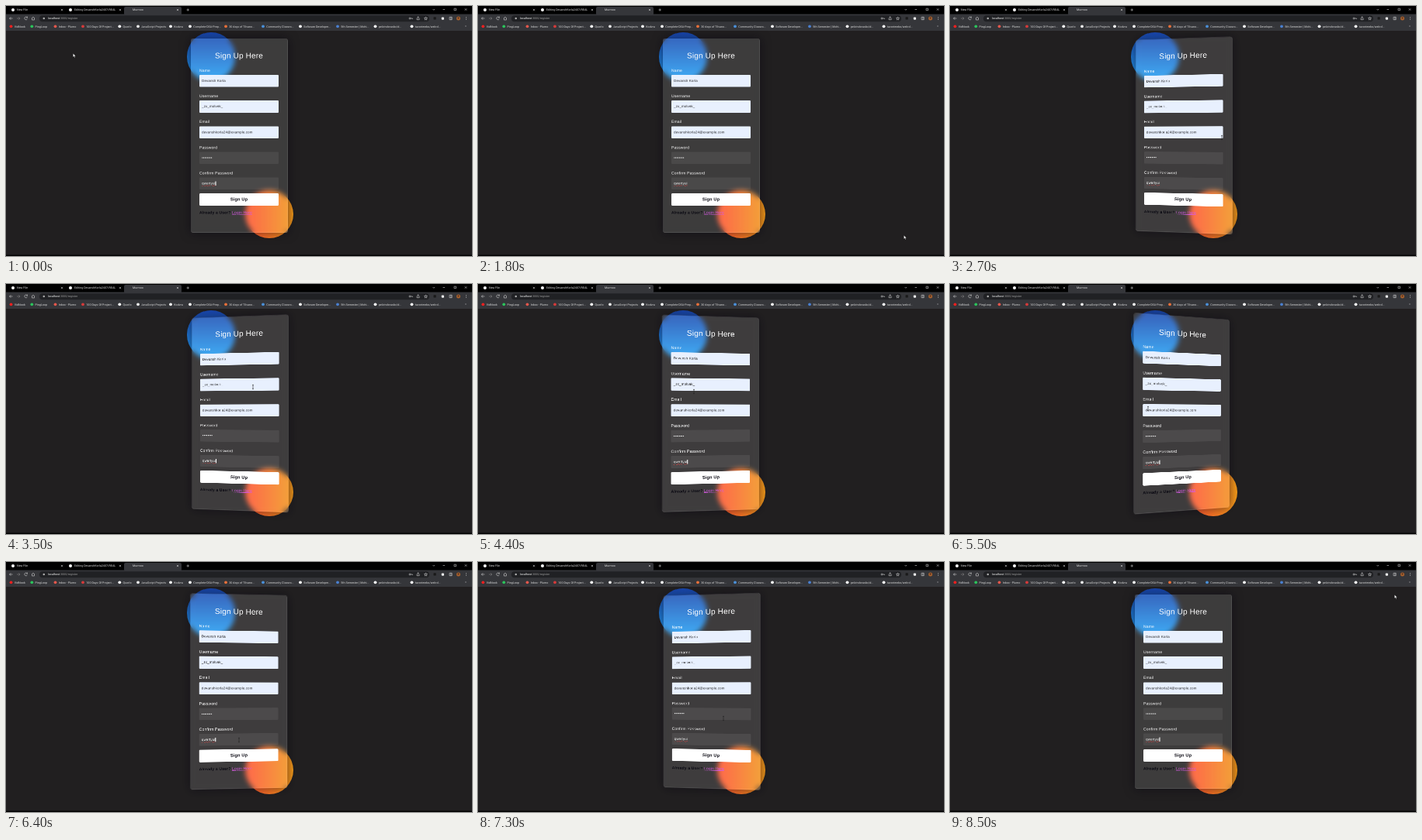
Write an HTML page that moves like this. It is 600 px wide and 323 px high and loops after 8600 ms.

```html
<!DOCTYPE html>
<html lang="en">
<head>
<meta charset="utf-8">
<title>Sign up</title>
<style>
  html, body { margin: 0; width: 100%; height: 100%; overflow: hidden; background: #211f20; }
  svg { position: absolute; left: 0; top: 0; width: 600px; height: 323px; }
  svg text { font-family: Roboto, sans-serif; font-size: 3.7px; text-rendering: geometricPrecision; }
  .ball { position: absolute; width: 62.5px; height: 62.5px; border-radius: 50%; }
  .blue { left: 232.8px; top: 34.4px; background: linear-gradient(#1845ad, #23a2f6); }
  .orange { left: 307.5px; top: 237.8px; background: linear-gradient(to right, #ff512f, #f09819); }
  #glass { position: absolute; left: 237.5px; top: 41.9px; width: 125px; height: 251px;
    border-radius: 3.1px; background: rgba(255,255,255,.13);
    -webkit-backdrop-filter: blur(3.1px); backdrop-filter: blur(3.1px);
    box-shadow: 0 0 12.5px rgba(8,7,16,.6); }
  /* Twice the size and scaled by half, so that small text stays smooth when tilted. */
  #form { position: absolute; left: 175px; top: -83.6px; width: 250px; height: 502px;
    box-sizing: border-box; padding: 31.5px 22px; will-change: transform;
    border: 1px solid rgba(255,255,255,.1); border-radius: 6.25px;
    font: 10px/11.25px Arial, "Liberation Sans", sans-serif; letter-spacing: .31px; color: #fff;
    text-rendering: geometricPrecision; white-space: nowrap; }
  h3 { margin: 0 0 20px; font-size: 20px; line-height: 26.25px; font-weight: 400; text-align: center; }
  label { display: block; }
  .field { box-sizing: border-box; height: 31.25px; margin: 5px 0 18.75px; padding: 0 6.25px;
    border-radius: 2px; background: rgba(255,255,255,.07); font-size: 8.75px; line-height: 31.25px; }
  .filled { background: #e8f0fe; color: #222; }
  .field.last { margin-bottom: 9.4px; }
  .typo { text-decoration: underline wavy #e04040 .6px; }
  #caret { display: inline-block; width: 1.25px; height: 11px; background: #fff; vertical-align: -2.5px; }
  .button { height: 32px; border-radius: 3px; background: #fff; color: #080710;
    font-size: 11.25px; line-height: 32px; font-weight: 700; text-align: center; }
  .login { margin-top: 13px; color: #080710; font-weight: 700; }
  .login u { color: #d55ae0; font-weight: 400; }
</style>
</head>
<body>
<svg id="browser" viewBox="0 0 600 323"></svg>
<div class="ball blue"></div>
<div class="ball orange"></div>
<div id="glass"></div>
<div id="form">
  <h3>Sign Up Here</h3>
  <label>Name</label><div class="field filled">Devansh Korla</div>
  <label>Username</label><div class="field filled">_zx_molvek_</div>
  <label>Email</label><div class="field filled">devanshkorla24@example.com</div>
  <label>Password</label><div class="field">••••••••</div>
  <label>Confirm Password</label>
  <div class="field last"><span class="typo">qwertyui</span><span id="caret"></span></div>
  <div class="button">Sign Up</div>
  <div class="login">Already a User? <u>Login Here</u></div>
</div>
<svg viewBox="0 0 600 323">
  <g id="pointer">
    <path id="arrow" d="M-1.7-2.8V2l1.1-1 .8 1.8.9-.4-.8-1.7h1.5z" fill="#fff" stroke="#000" stroke-width=".35"/>
    <path id="beam" d="M-1-2.6H1M0-2.6V2.6M-1 2.6H1" fill="none" stroke="#222" stroke-width=".6"/>
  </g>
</svg>
<script>
const $ = id => document.getElementById(id);

// ---- Browser window ----
const BAR = '#35363a', FIELD = '#202124';
const rect = (x, y, w, h, fill, r = 0) =>
  `<rect x="${x}" y="${y}" width="${w}" height="${h}" rx="${r}" fill="${fill}"/>`;
const dot = (x, y, r, fill) => `<circle cx="${x}" cy="${y}" r="${r}" fill="${fill}"/>`;
const text = (x, y, s, fill = '#dcdcdc') => `<text x="${x}" y="${y + 1.3}" fill="${fill}">${s}</text>`;
const line = (d, color = '#ddd') => `<path d="${d}" fill="none" stroke="${color}" stroke-width=".55"/>`;
const cross = (x, y, r = 1.1) => line(`M${x - r} ${y - r}l${2 * r} ${2 * r}m0 ${-2 * r}l${-2 * r} ${2 * r}`);

const tabs = [[9, 'New File', 72], [83, 'Editing DevanshKorla2407/REAL', 147], [null, 'Murmoo', 221]];
const bookmarks = [
  [6.5, 'VidNook', '#f02020'], [33.3, 'PingLoop', '#2bc35a'], [63.5, 'Inbox - Plumo', '#e2574c'],
  [99, '100 Days Of Project...', '#d63a3a'], [146.3, 'Quorlo', '#fff'],
  [170, 'JavaScript Projects', '#eee'], [212, 'Kodvra', '#fff'],
  [237, 'Complete-DSA-Prep...', '#fff'], [283, '30 days of Tilvano...', '#e8703a'],
  [331, 'Community Classro...', '#4a90d9'], [379, 'Software Developm...', '#fff'],
  [427, '5th Semester ( Mohi...', '#4a7fd0'], [475.5, 'pelvindorasko/d...', '#fff'],
  [522.5, 'tavorimeko/web-d...', '#fff']
];

$('browser').innerHTML =
  rect(0, 0, 600, 11, '#000') + rect(0, 10.5, 600, 21.5, BAR) +
  rect(152, 1, 74, 11, BAR, 2) +
  tabs.map(([icon, title, close]) =>
    (icon ? dot(icon, 5, 2, '#fff') : '') + text(icon ? icon + 5 : 163, 5, title) + cross(close, 5)).join('') +
  line('M232.5 5h3.4M234.2 3.3v3.4') +
  line('M549.5 4l1.3 1.3 1.3-1.3M562.5 4.5h2.6M577 3.2h2.5v2.5h-2.5z') + cross(592, 4.5, 1.2) +
  rect(43, 12.2, 502, 8, FIELD, 4) +
  line('M8.5 16h-4m1.7-1.7L4.5 16l1.7 1.7') +
  line('M14 16h4m-1.7-1.7L18 16l-1.7 1.7', '#888') +
  line('M27.3 14.8a1.9 1.9 0 1 0 .1 2M27.5 13.6v1.5h-1.5') +
  line('M33 16l2-1.9 2 1.9M33.5 15.8v2.2h3v-2.2') +
  dot(48.8, 16, 1.3, '#aaa') +
  text(54, 16, 'localhost<tspan fill="#999">:3000/register</tspan>', '#fff') +
  line('M519 16a1 1 0 1 0 2 0a1 1 0 1 0-2 0M521 16h2.4v1') +
  line('M529 15.5v2.2h3.2v-2.2M530.6 16.5v-2.8l-1 1m1-1l1 1') +
  line('M540.5 14l.6 1.4 1.4.1-1.1 1 .4 1.5-1.3-.8-1.3.8.4-1.5-1.1-1 1.4-.1z') +
  rect(550.5, 14.3, 3.2, 3.2, '#191919', .5) +
  rect(560.8, 14.5, 3.2, 3.2, '#eee', .8) +
  line('M571 14.3h3.2v3.4h-3.2zM573 14.3v3.4') +
  dot(582.5, 16, 2.5, '#a8612d') + dot(582.5, 15.6, 1, '#4a2a1b') +
  [14.5, 16, 17.5].map(y => dot(592.5, y, .45, '#ddd')).join('') +
  bookmarks.map(([x, title, color]) => dot(x, 26.3, 1.9, color) + text(x + 4.3, 26.3, title)).join('') +
  text(591, 26, '»') +
  rect(0, 321.6, 600, 1.4, '#000');

// ---- Motion ----
const LOOP = 8600, STEP = 100, MAX_TILT = 15;
const card = { left: 237.5, top: 41.9, width: 125, height: 251 };
const path = [ // time, x, y
  [0, 88, 64], [900, 88, 64], [1800, 550, 299], [2000, 550, 299], [2700, 350, 170],
  [3500, 318, 133], [4400, 278, 139], [5500, 255, 161], [6100, 280, 225], [6700, 320, 235],
  [7300, 316, 202], [8100, 580, 80], [8500, 574, 45], [8600, 574, 45]
];

function pointerAt(time) {
  const t = Math.max(0, time);
  const i = path.findIndex(key => key[0] > t);
  const [t0, x0, y0] = path[i - 1], [t1, x1, y1] = path[i];
  const p = (t - t0) / (t1 - t0), eased = p * p * (3 - 2 * p);
  return [x0 + (x1 - x0) * eased, y0 + (y1 - y0) * eased];
}

// The side of the card under the pointer comes forward; outside, the card rests.
function tiltTarget(t) {
  const [x, y] = pointerAt(t);
  const u = (x - card.left) / card.width, v = (y - card.top) / card.height;
  const inside = u > 0 && u < 1 && v > 0 && v < 1;
  return inside ? MAX_TILT * (1 - 2 * u) : 0;
}

// Averaging the last 300 ms softens entering and leaving.
function tiltAt(t) {
  const SAMPLES = 16;
  let sum = 0;
  for (let i = 0; i < SAMPLES; i++) sum += tiltTarget(t - i * 20);
  return sum / SAMPLES;
}

function draw(t) {
  const [x, y] = pointerAt(t);
  const turn = `rotateY(${tiltAt(t)}deg)`;
  $('glass').style.transform = `perspective(312.5px) ${turn}`;
  $('form').style.transform = `scale(.5) perspective(625px) ${turn}`;

  const overField = x > 249 && x < 351 && y > 88 && y < 240 && (y - 88) % 33.1 < 19;
  $('pointer').setAttribute('transform', `translate(${x} ${y})`);
  $('arrow').style.display = overField ? 'none' : '';
  $('beam').style.display = overField ? '' : 'none';
  $('caret').style.opacity = (t + 60) % 1060 < 530 ? 1 : 0;
}

const start = performance.now();
function tick() {
  const t = (performance.now() - start) % LOOP;
  draw(Math.floor(t / STEP) * STEP);
  requestAnimationFrame(tick);
}
tick();
</script>
</body>
</html>
```
